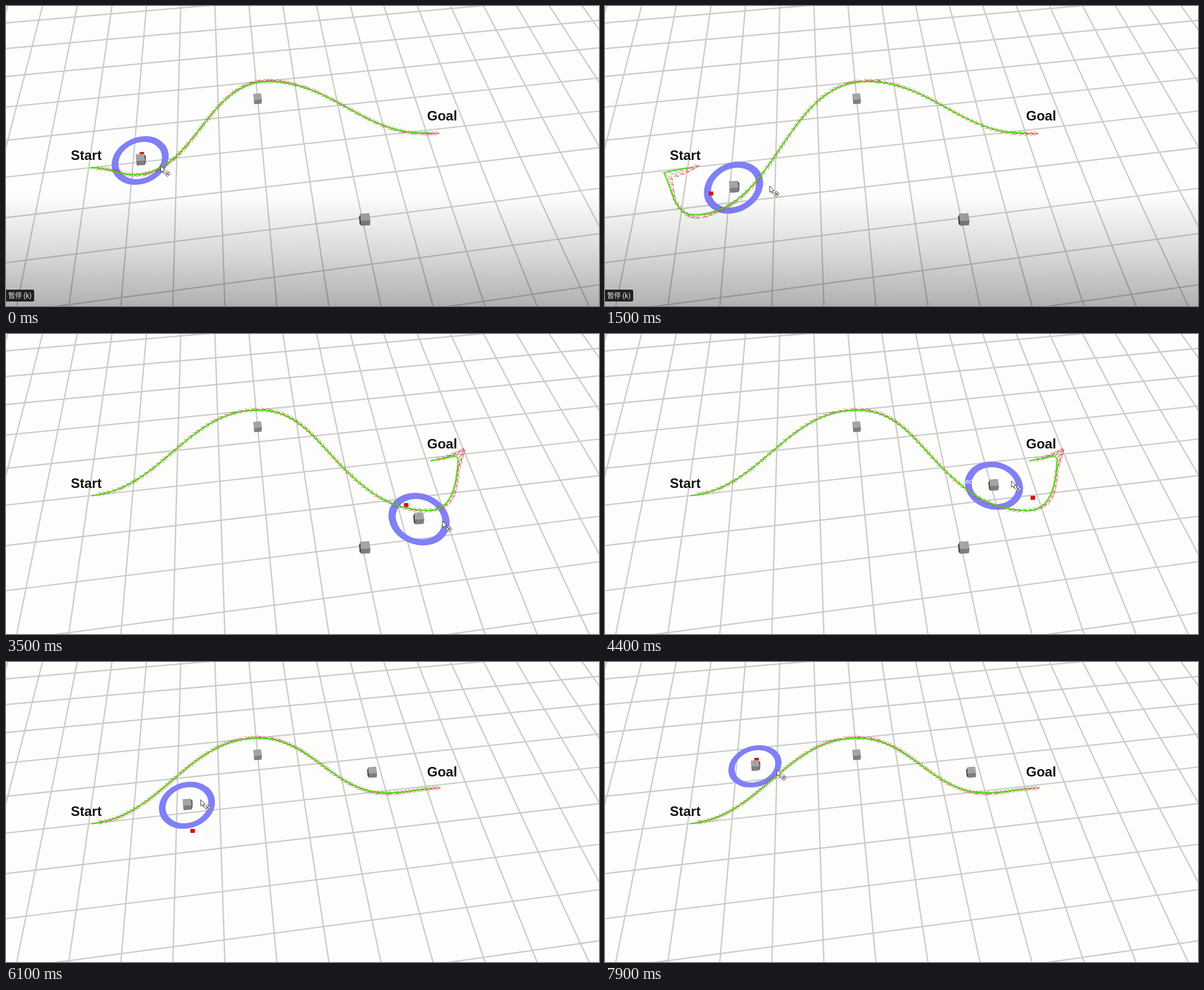
An HTML page with a canvas for the animation above (8000 ms loop, 1052x532 px).

```html
<!DOCTYPE html>
<html lang="en">
<head>
<meta charset="utf-8">
<title>Path planning around obstacles</title>
<style>
  html, body { margin: 0; width: 100%; height: 100%; overflow: hidden; background: #fdfdfc; }
  canvas { display: block; }
</style>
</head>
<body>
<canvas id="stage" width="1052" height="532"></canvas>
<script>
const W = 1052, H = 532, LOOP = 8000, STEP = 100;
const LAG = 300, LEAD = 60, MORPH = 300, DROP = 4700, GRAB = 5000;
const VANISH = { x: 338, y: -1064 };
const ctx = document.getElementById('stage').getContext('2d');

// Where the hand is: time, x, y. It drops one obstacle and grabs the next.
const hand = [
  [0, 238, 272], [1200, 185, 342], [1500, 228, 320], [2400, 604, 192], [2700, 616, 202],
  [3300, 725, 335], [4100, 756, 300], [4400, 690, 267], [DROP, 650, 195],
  [GRAB, 637, 378], [5500, 540, 425], [5800, 328, 309], [6100, 321, 252],
  [6600, 200, 120], [6900, 285, 241], [7200, 292, 335], [7400, 215, 378], [7600, 266, 183]
];

const clamp = v => Math.min(1, Math.max(0, v));
const mix = (a, b, k) => a.map((v, i) => v + (b[i] - v) * k);
const unit = (x, y) => { const d = Math.hypot(x, y) || 1; return [x / d, y / d]; };

// Evenly spaced poses [x, y, heading x, heading y] through knots [x, y, angle].
// A knot with a second angle is a change of gear.
function route(knots, count = 96) {
  const fine = [];
  let gear = Math.cos(knots[0][2]) < 0 ? -1 : 1, length = 0;
  for (let i = 1; i < knots.length; i++) {
    const [x0, y0, arrive, leave = arrive] = knots[i - 1], [x1, y1, angle] = knots[i];
    if (leave !== arrive) gear = -gear;
    const reach = 0.38 * Math.hypot(x1 - x0, y1 - y0);
    const curve = (a, b, da, db, u) => {
      const v = 1 - u, c = a + reach * da, d = b - reach * db;
      return a * v * v * v + 3 * c * u * v * v + 3 * d * u * u * v + b * u * u * u;
    };
    for (let u = 0.01; u < 1; u += 0.01) {
      const x = curve(x0, x1, Math.cos(leave), Math.cos(angle), u);
      const y = curve(y0, y1, Math.sin(leave), Math.sin(angle), u);
      const last = fine[fine.length - 1] || { x: x0, y: y0 };
      const dx = x - last.x, dy = y - last.y;
      length += Math.hypot(dx, dy);
      fine.push({ x, y, s: length, h: unit(gear * dx, gear * dy) });
    }
  }
  const poses = Array.from({ length: count }, (_, i) => {
    const { x, y, h } = fine.find(p => p.s >= length * i / (count - 1)) || fine[fine.length - 1];
    return [x, y, ...h];
  });
  return poses.map(([x, y], i) => {
    const near = poses.slice(Math.max(0, i - 4), i + 5);
    const sum = n => near.reduce((total, p) => total + p[n], 0);
    return [x, y, ...unit(sum(2), sum(3))];
  });
}

const BACK = 2.98;
const start = [148, 287, -0.08], goal = [752, 225, -0.06];
const crest = [448, 135, 0], farCrest = [465, 134, 0], low = [675, 232, 0];
const dip = route([start, crest, low, goal]);

// Each plan takes over at its time.
const plans = [
  [0, route([start, [225, 299, 0], farCrest, goal])],
  [400, route([[148, 287, BACK], [104, 295, BACK, 1.1], [157, 370, 0], farCrest, goal])],
  [2000, route([start, farCrest, goal])],
  [2300, route([start, crest, [622, 213, 0.12], goal])],
  [2900, route([start, crest, [600, 239, 0.78], [752, 313, 0], [802, 216, -1.55, BACK],
    [752, 225, BACK]])],
  [4400, dip],
  [6900, route([start, [272, 204, -0.5], crest, low, goal])],
  [7300, dip]
];

function handAt(t) {
  const i = hand.findIndex(key => key[0] > t);
  if (i < 0) return hand[hand.length - 1].slice(1);
  const a = hand[Math.max(0, i - 1)], b = hand[i];
  return mix(a, b, clamp((t - a[0]) / (b[0] - a[0]))).slice(1);
}

const firstAt = t => handAt(Math.min(t, DROP));
const secondAt = t => handAt(Math.max(t, GRAB));
const heldAt = t => t < (DROP + GRAB) / 2 ? firstAt(t) : secondAt(t);

function planAt(t) {
  const i = plans.filter(([from]) => from <= t).length - 1;
  const [from, poses] = plans[i], old = plans[Math.max(0, i - 1)][1];
  return poses.map((p, n) => mix(old[n], p, clamp((t - from) / MORPH)));
}

function line(x1, y1, x2, y2) {
  ctx.beginPath();
  ctx.moveTo(x1, y1);
  ctx.lineTo(x2, y2);
  ctx.stroke();
}

function polygon(points, fill) {
  ctx.beginPath();
  points.forEach(([x, y]) => ctx.lineTo(x, y));
  ctx.closePath();
  ctx.fillStyle = fill;
  ctx.fill();
}

function drawGrid() {
  ctx.strokeStyle = '#cbcbc9';
  ctx.lineWidth = 2.4;
  for (let n = 0; n <= 9; n++) {
    const y = 1 / (9.141e-4 - n * 3.655e-5) + VANISH.y;
    line(0, y, W, y - W * (0.083 + y * 0.000093));
  }
  for (let n = -5; n <= 14; n++) {
    line((310 + 61.4 * n) / (1 + 0.002 * n), 0, 296 + 92.3 * n, H);
  }
}

const scaleAt = y => (y - VANISH.y) / 1342;

function drawCube([x, y]) {
  const s = scaleAt(y);
  ctx.save();
  ctx.translate(x, y);
  ctx.scale(s, s);
  if (x < 400) polygon([[6, -10], [10, -6], [10, 6], [8, 10]], '#484848');
  if (x > 500) polygon([[-7, -9], [-10, -4], [-9, 8], [-6, 11]], '#484848');
  polygon([[-8, -9], [7, -10], [9, 3], [-7, 4]], '#a4a4a4');
  polygon([[-7, 3], [9, 2], [8, 10], [-6, 11]], '#7e7e7e');
  ctx.restore();
}

// A circle lying on the ground plane.
function drawRing([x, y]) {
  const s = scaleAt(y), a = 50.8 * s, b = 43.3 * s * s;
  const lean = (x - VANISH.x) / (y - VANISH.y);
  ctx.save();
  ctx.transform(a, -0.1 * a, lean * b, b, x, y + 2);
  ctx.beginPath();
  ctx.arc(0, 0, 0.88, 0, Math.PI * 2);
  ctx.lineWidth = 0.235;
  ctx.strokeStyle = '#8080f7';
  ctx.stroke();
  ctx.restore();
}

// Arrows lie under the line, so they show where the route bends away from them.
function drawRoute(poses) {
  ctx.lineWidth = 0.9;
  ctx.strokeStyle = 'rgba(190,50,28,.75)';
  for (const [x, y, hx, hy] of poses) {
    const tx = x + hx * 20, ty = y + hy * 20;
    line(x, y, tx, ty);
    for (const side of [-3.6, 3.6]) {
      line(tx, ty, tx - hx * 8 - hy * side, ty - hy * 8 + hx * side);
    }
  }
  ctx.beginPath();
  poses.forEach(([x, y]) => ctx.lineTo(x, y));
  ctx.strokeStyle = 'rgba(70,225,20,.88)';
  ctx.lineWidth = 2.5;
  ctx.stroke();
}

function drawPointer([x, y]) {
  ctx.save();
  ctx.translate(x + 39, y + 8);
  ctx.strokeStyle = '#333';
  ctx.lineWidth = 1;
  polygon([[0, 0], [0, 11], [2.5, 9], [4.5, 13], [6, 12], [4.5, 8.5], [8, 8]], '#fff');
  ctx.stroke();
  ctx.translate(12, 14);
  ctx.strokeStyle = '#666';
  for (let i = 0; i < 4; i++) {
    ctx.rotate(Math.PI / 2);
    polygon([[0, 0], [1, -2], [3, -2], [0, -5.5], [-3, -2], [-1, -2]], '#fff');
    ctx.stroke();
  }
  ctx.restore();
}

function drawText(text, x, y, font, color) {
  ctx.font = font;
  ctx.fillStyle = color;
  ctx.fillText(text, x, y);
}

function drawPlayer(alpha) {
  ctx.globalAlpha = alpha;
  const shade = ctx.createLinearGradient(0, 335, 0, H);
  shade.addColorStop(0, 'rgba(0,0,0,0)');
  shade.addColorStop(0.48, 'rgba(0,0,0,.13)');
  shade.addColorStop(1, 'rgba(0,0,0,.3)');
  ctx.fillStyle = shade;
  ctx.fillRect(0, 335, W, H - 335);
  ctx.beginPath();
  ctx.roundRect(-3, 503, 53, 21, 3);
  ctx.fillStyle = '#202020';
  ctx.fill();
  drawText('暂停 (k)', 4, 518, '12px Roboto, "Noto Sans CJK SC", "Noto Sans CJK", sans-serif', '#eee');
  ctx.globalAlpha = 1;
}

function draw(now) {
  const t = Math.floor((now % LOOP) / STEP) * STEP;
  const held = heldAt(t), [seenX, seenY] = heldAt(t - LAG);

  ctx.fillStyle = '#fdfdfc';
  ctx.fillRect(0, 0, W, H);
  drawGrid();
  drawRing(held);
  ctx.fillStyle = '#e00d0d';
  ctx.fillRect(seenX - 1, seenY - 13, 8, 7);
  [[446, 164], firstAt(t), secondAt(t)].forEach(drawCube);
  drawRoute(planAt(t));
  if (t >= 4200 && t < 4500) {
    drawText('acl', held[0] - 51, held[1] - 2, '11px "Liberation Sans", sans-serif', '#fff');
  }

  const label = 'bold 24px "Liberation Sans", Arial, sans-serif';
  drawText('Start', 115, 273, label, '#121212');
  drawText('Goal', 747, 203, label, '#121212');
  drawPointer(handAt(t + LEAD));
  drawPlayer(clamp((2200 - t) / 300));
}

function tick() {
  draw(performance.now());
  requestAnimationFrame(tick);
}
tick();
</script>
</body>
</html>
```
